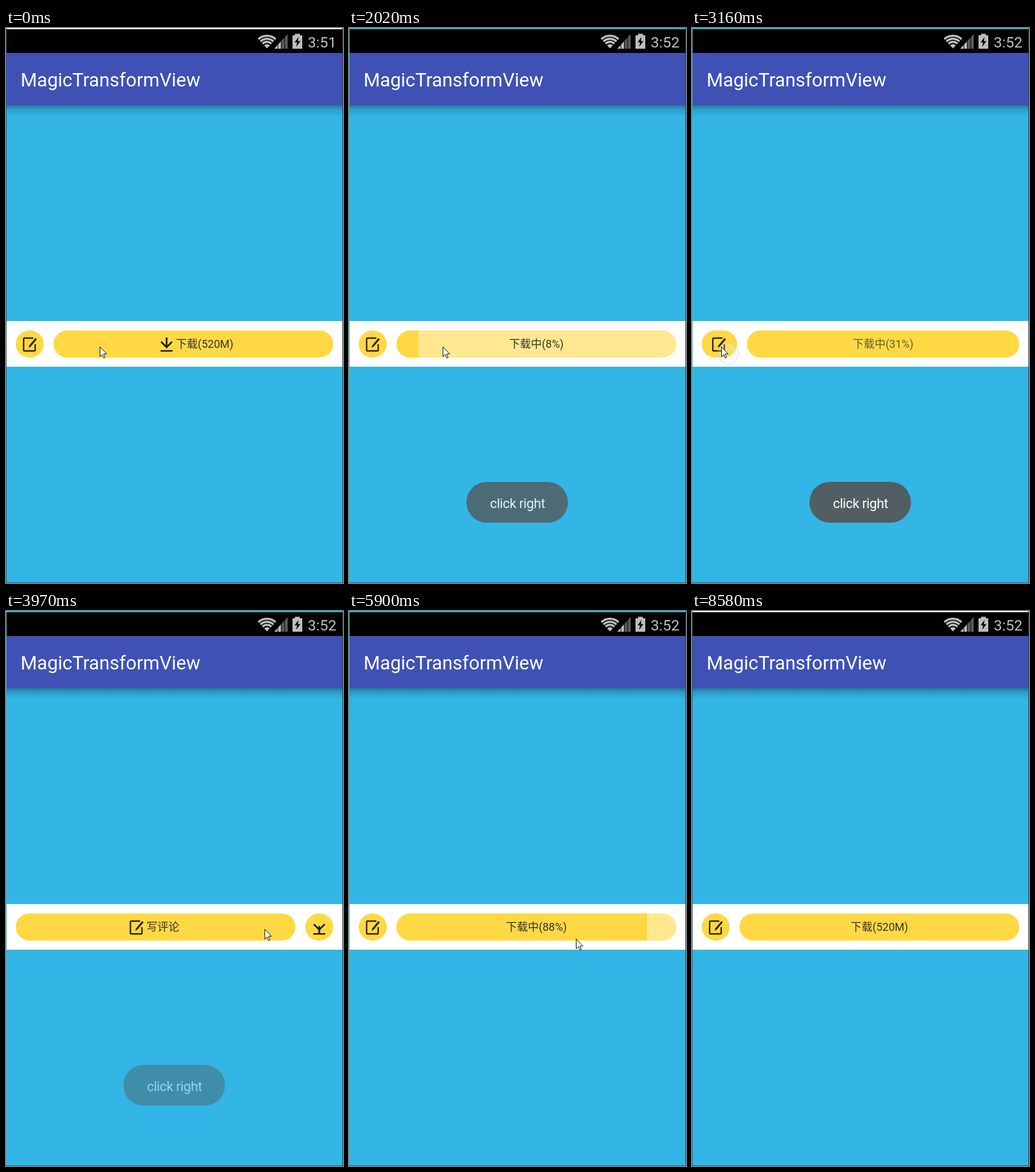
Animation, 554 px wide and 911 px high, one loop 9550 ms. Source, as an HTML page:

```html
<!DOCTYPE html>
<html lang="zh-CN">
<head>
<meta charset="utf-8">
<title>MagicTransformView</title>
<style>
  html, body { margin: 0; width: 100%; height: 100%; overflow: hidden; background: #33b5e5; }
  svg { display: block; width: 554px; height: 911px; }
  text { font-family: Roboto, "Noto Sans CJK SC", "Noto Sans CJK", sans-serif; }
  .label { font-size: 18px; fill: #333; }
  .mid { text-anchor: middle; }
  .icon { fill: none; stroke: #2e2717; stroke-width: 2.4; }
</style>
</head>
<body>
<svg viewBox="0 0 554 911" xmlns="http://www.w3.org/2000/svg">
  <defs>
    <linearGradient id="shade" x1="0" y1="0" x2="0" y2="1">
      <stop offset="0" stop-color="#000" stop-opacity=".32"/>
      <stop offset=".4" stop-color="#000" stop-opacity=".12"/>
      <stop offset="1" stop-color="#000" stop-opacity="0"/>
    </linearGradient>
    <clipPath id="fan"><path d="M429 33.5L406 9H452Z"/></clipPath>
    <clipPath id="wedge"><path d="M441 34L463 10V34Z"/></clipPath>
    <clipPath id="pill"><rect id="pillBox" y="496.5" height="44.5" rx="22.25"/></clipPath>
    <g id="edit" class="icon">
      <path d="M6-10H-8.500Q-10-10-10-8.500V9.500Q-10 11-8.500 11H7.500Q9 11 9 9.500V0"/>
      <path d="M10.500-9L0 3.500" stroke-width="3.200"/>
      <path d="M-1.500 5.500L1.500 3.500L-.5 2Z" fill="#2e2717" stroke-width=".6"/>
    </g>
  </defs>

  <rect width="554" height="911" fill="#33b5e5"/>
  <rect y="127" width="554" height="18" fill="url(#shade)"/>
  <rect y="2" width="554" height="39"/>
  <rect y="41" width="554" height="86" fill="#3f51b5"/>
  <text x="24" y="96" font-size="31" fill="#fff">MagicTransformView</text>

  <g clip-path="url(#fan)" fill="none" stroke="#bebebe" stroke-width="3.400">
    <circle cx="429" cy="33" r="20.300"/>
    <circle cx="429" cy="33" r="15.200"/>
    <circle cx="429" cy="33" r="10.200"/>
    <circle cx="429" cy="33" r="3.200" stroke-width="6.400"/>
  </g>
  <g clip-path="url(#wedge)">
    <path d="M441 8H446.500V34H441ZM447.500 8H452V34H447.500Z" fill="#bebebe"/>
    <path d="M453 8H457.500V34H453ZM458.500 8H463V34H458.500Z" fill="#5c5c5c"/>
  </g>
  <path d="M475 9.500H483V12H487V34H471V12H475Z" fill="#bebebe"/>
  <path d="M481 14.500L474.500 23.500H478.500L477 31L484 21.500H479.800Z"/>
  <text id="clock" x="496" y="32" font-size="24.500" fill="#bebebe"></text>

  <rect y="481" width="554" height="75" fill="#fff"/>
  <rect id="left" x="16" y="496.5" height="44.5" rx="22.25" fill="#ffd843"/>
  <use id="editIcon" href="#edit"/>
  <text id="comment" class="label" y="525">写评论</text>

  <g clip-path="url(#pill)">
    <rect id="base" x="70" y="490" width="480" height="60"/>
    <rect id="fill" x="78" y="490" height="60" fill="#ffd843"/>
  </g>
  <text id="status" class="label mid" y="525"></text>
  <g id="loadIcon" class="icon" style="stroke:#1c1a14">
    <path d="M-9.800 11H9.800"/>
    <path id="stem" stroke-width="2.800"/>
    <path id="head" stroke-width="2.800"/>
  </g>

  <g id="toast">
    <rect x="193" y="745" width="167" height="67" rx="33.500" fill="#515e63"/>
    <text class="mid" x="277" y="788" font-size="22" letter-spacing="-.4" fill="#fff">click right</text>
  </g>

  <circle id="ring" r="16.800" fill="#f0f0fa" fill-opacity=".6" stroke="#c6c6ea" stroke-width="1.500"/>
  <path id="cursor" d="M.5.5V16.500L4.200 13L6.800 18.800L9 17.800L6.500 12H11.500Z" fill="#fff" stroke="#111"/>

  <g id="frame">
    <rect id="edgeTop" width="554" height="2"/>
    <rect id="edgeLeft" width="1" height="910"/>
    <rect x="553" width="1" height="911" fill="#27404c"/>
    <rect y="910" width="554" height="1" fill="#2c6378"/>
  </g>
</svg>

<script>
const LOOP = 9550;
const el = {};
document.querySelectorAll('[id]').forEach(n => el[n.id] = n);

const set = (node, attrs) => {
  for (const k in attrs) node.setAttribute(k, attrs[k]);
};
const clamp = v => Math.min(1, Math.max(0, v));
const mix = (a, b, k) => a + (b - a) * k;
const ease = x => (1 - Math.cos(Math.PI * x)) / 2;

// The screen refreshes in bursts: first time, last time, count.
const bursts = [
  [0, 0, 1], [1310, 2020, 6], [2140, 2290, 2], [2410, 3160, 6], [3310, 3430, 2],
  [3580, 3970, 4], [4120, 4540, 4], [4690, 4690, 1], [4970, 4970, 1],
  [5120, 5900, 7], [6050, 7070, 9], [7320, 7740, 4], [8580, 8580, 1]
];
const ticks = bursts.flatMap(([a, b, n]) =>
  Array.from({ length: n }, (_, i) => n > 1 ? mix(a, b, i / (n - 1)) : a));

// time, x, y
const path = [
  [0, 154, 523], [2300, 154, 523], [2800, 48, 523], [3560, 48, 523],
  [3970, 425, 522], [4400, 508, 522], [5480, 508, 522], [5900, 373, 538],
  [6300, 235, 542], [7050, 83, 539], [7180, 83, 539], [7640, 468, 893],
  [7740, 468, 930], [LOOP, 468, 930]
];
const clicks = [1310, 2960, 4950];

function pointer(t) {
  const i = Math.max(1, path.findIndex(p => p[0] >= t));
  const [a, b] = [path[i - 1], path[i]];
  const k = (t - a[0]) / (b[0] - a[0]);
  return [mix(a[1], b[1], k), mix(a[2], b[2], k)];
}

function drawButtons(t) {
  const x = clamp((t - 3105) / 500) - clamp((t - 5060) / 500);
  const p = ease(x);
  const leftW = mix(46, 460, p);
  const rightX = mix(78, 492, p);
  const rightMid = (rightX + 538) / 2;
  set(el.left, { width: leftW });
  set(el.pillBox, { x: rightX, width: 538 - rightX });

  const editX = 16 + leftW / 2 - 31.5 * p;
  set(el.editIcon, { x: editX, y: 519 });
  set(el.comment, { x: editX + 16.5, opacity: clamp(x * 2 - 1) });

  const pct = Math.floor((t - 1630) / 48.5);
  const busy = pct >= 0 && pct < 100;
  const partial = busy && x === 0;
  set(el.base, { fill: partial ? '#ffe88f' : '#ffd843' });
  set(el.fill, { width: partial ? Math.max(0, pct * 4.7 - 1.6) : 0 });

  const fresh = pct < 0;
  el.status.textContent = busy ? `下载中(${pct}%)` : '下载(520M)';
  set(el.status, { x: rightMid + (fresh ? 18.5 : 0), opacity: clamp(1 - x * 2.2) });

  const tip = fresh ? 5 : mix(-6, 5, (t - 3600 + LOOP) % 1000 / 1000);
  const arm = Math.min(9, tip + 11);
  set(el.loadIcon, {
    transform: `translate(${fresh ? 264 : rightMid} 519)`,
    opacity: fresh ? 1 : clamp(x * 2 - 1)
  });
  set(el.stem, { d: fresh ? 'M0-11V5' : `M0 ${Math.min(tip, -2)}V10` });
  set(el.head, { d: `M${-arm} ${tip - arm}L0 ${tip}L${arm} ${tip - arm}` });
}

function draw(t) {
  const active = t >= 1310 && t < 8580;
  set(el.edgeTop, { fill: active ? '#2fb4cf' : '#f4f8fa' });
  set(el.edgeLeft, { fill: active ? '#3fb3c4' : '#2d6577' });
  el.clock.textContent = t < 1310 ? '3:51' : '3:52';

  drawButtons(t);
  set(el.toast, { opacity: clamp((t - 1740) / 330) - clamp((t - 3750) / 400) });

  const [x, y] = pointer(t);
  set(el.cursor, { transform: `translate(${x} ${y})` });
  const age = Math.min(...clicks.map(c => t < c ? 1e4 : t - c));
  set(el.ring, { cx: x + 11.5, cy: y + 11.5, opacity: clamp(1 - age / 350) });
}

const start = performance.now();
function loop() {
  const now = (performance.now() - start) % LOOP;
  draw(ticks.filter(t => t <= now + 0.01).pop() || 0);
  requestAnimationFrame(loop);
}
loop();
</script>
</body>
</html>
```
